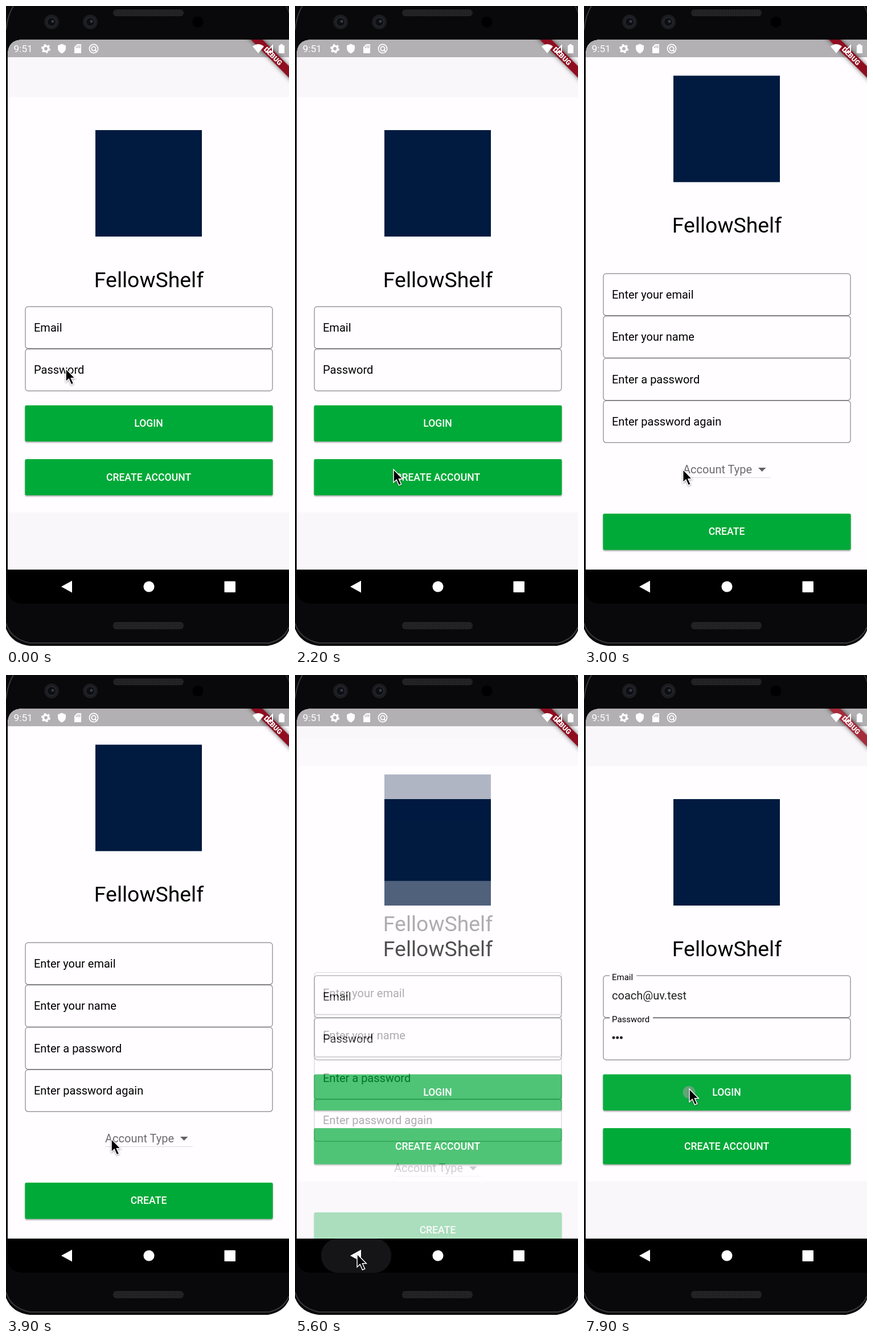
An HTML page that plays this animation: 497x1126 px, repeating every 8000 ms.

```html
<!DOCTYPE html>
<html lang="en">
<head>
<meta charset="utf-8">
<title>Sign-in flow</title>
<style>
  html, body { margin: 0; width: 100%; height: 100%; overflow: hidden; background: #fff; }
  svg { display: block; width: 100%; height: 100%; font-family: Roboto, sans-serif; }
  .title { font-size: 37.4px; text-anchor: middle; }
  .label { font-size: 20px; }
  .small { font-size: 15px; }
  .field { fill: none; stroke: #858487; stroke-width: 1.2; }
  .btn > rect { fill: #00aa38; filter: drop-shadow(0 2px 1.2px rgba(0, 0, 0, .32)); }
  .btn text { fill: #fff; font-size: 17.6px; font-weight: 500; text-anchor: middle; }
</style>
</head>
<body>
<svg viewBox="0 0 497 1126" preserveAspectRatio="none">
  <defs>
    <clipPath id="screen"><path d="M3 990V86Q3 59 30 59H497V990Z"/></clipPath>
    <clipPath id="loginClip"><rect x="33.4" y="701.4" width="435.2" height="63.6" rx="2.4"/></clipPath>
    <clipPath id="createClip"><rect x="33.4" y="796" width="435.2" height="63.6" rx="2.4"/></clipPath>
    <pattern id="mesh" width="4" height="4" patternUnits="userSpaceOnUse">
      <rect width="4" height="4" fill="#242326"/><circle cx="2" cy="2" r="1" fill="#19181a"/>
    </pattern>
  </defs>

  <!-- phone body -->
  <path d="M0 0H497V1097Q488 1119 460 1124H42Q10 1120 0 1094Z" fill="#09080a"/>
  <g fill="none" stroke="#39383b" stroke-width="2">
    <path d="M13 0Q3 16 0 42M0 1084Q8 1112 42 1119H462Q488 1113 497 1091"/>
    <path d="M492 0Q496 6 497 12" stroke="#2a292b"/>
  </g>
  <rect x="188" y="6" width="124" height="12" rx="6" fill="url(#mesh)"/>
  <rect x="188" y="1082" width="124" height="13" rx="6" fill="url(#mesh)"/>
  <g id="cameras"></g>
  <circle cx="337" cy="28" r="9.5" fill="#000"/>

  <!-- pages -->
  <g clip-path="url(#screen)">
    <g id="login"></g>
    <g id="create"></g>
    <rect x="3" y="59" width="494" height="31" fill="#b2b0b2"/>
    <g transform="translate(469.1 87.9) rotate(45)">
      <rect x="-60" y="-7.2" width="120" height="14.4" id="ribbon"
        style="filter:drop-shadow(0 0 4px rgba(0,0,0,.6))"/>
      <text y="4.4" fill="#fff" font-size="12.3" font-weight="900" text-anchor="middle">DEBUG</text>
    </g>
    <g fill="#fff">
      <text x="13.5" y="81" font-size="17.3">9:51</text>
      <g fill="none" stroke="#fff">
        <circle cx="70" cy="75" r="4.6" stroke-width="3.4"/>
        <circle cx="70" cy="75" r="6.8" stroke-width="2.6" stroke-dasharray="3.56"/>
        <circle cx="154" cy="75" r="7.6" stroke-width="1.7"/>
        <circle cx="154" cy="75" r="3.6" stroke-width="1.8"/>
        <path d="M156 77L160 81" stroke-width="2"/>
      </g>
      <path d="M98 66.500L105 69.500V75Q104 81 98 83.500Q92 81 91 75V69.500Z"/>
      <path d="M125 67H132V83H120V72Z"/>
      <path d="M123.500 71V74M126.500 69V74M129.500 69V74" stroke="#b2b0b2" stroke-width="1.4"/>
      <path d="M433 71Q443 63 453 71L443 83Z"/>
      <path d="M469 67V82H455ZM467 72L459 80H467Z" fill-rule="evenodd"/>
      <path d="M481.500 67H486V69H489V83H479V69H481.500Z"/>
    </g>
  </g>

  <!-- navigation bar -->
  <path d="M3 990H497V1050H30Q3 1050 3 1022Z" fill="#000"/>
  <rect id="pill" x="46" y="990" width="123" height="60" rx="29" fill="#2b292c"/>
  <g fill="#fff">
    <path d="M97 1020L116 1009.500V1030.500Z"/>
    <circle cx="251" cy="1020" r="9.500"/>
    <rect x="383.500" y="1010.500" width="19.500" height="19.500" rx="1"/>
  </g>
  <path id="cursor" d="M0 0V23L5.200 18.300L9.500 28L13.700 26.200L9.400 16.800H16.300Z" fill="#000"
    stroke="#fff" stroke-width="1.500" style="filter:drop-shadow(0 1.500px 1.500px rgba(0,0,0,.4))"/>
</svg>
<script>
const $ = id => document.getElementById(id);
const LOOP = 8000, STEP = 100, CUT = 5900;
const PITCH = 74.4;

const text = (x, y, s, cls = 'label', more = '') =>
  `<text x="${x}" y="${Math.round(y)}" class="${cls}" ${more}>${s}</text>`;
const box = y => `<rect class="field" x="34" y="${y}" width="434" height="73.5" rx="4.8"/>`;
const field = (y, s) => box(y) + text(49, y + 43.8, s);
const button = (y, s, extra = '') =>
  `<g class="btn"><rect x="33.4" y="${y}" width="435.2" height="63.6" rx="2.4"/>${extra}` +
  text(250.5, y + 37.6, s, '') + '</g>';
const header = y =>
  `<rect x="157" y="${y + 27}" width="187" height="187" fill="#001a40"/>` +
  text(251, y + 303, 'FellowShelf', 'title');

// press feedback: a tint over the whole button and a growing circle
const press = (id, x, y) =>
  `<g clip-path="url(#${id}Clip)">
     <rect id="${id}Tint" x="33" y="${y - 60}" width="436" height="120" fill="#fff"/>
     <circle id="${id}Ink" cx="${x}" cy="${y}"/></g>`;

// outlined field with its label set into the top border
const filledField = (y, s, gapEnd, value) =>
  box(y) + `<path d="M45 ${y}H${gapEnd}" stroke="#fffdff" stroke-width="3"/>` +
  text(49, y + 7.8, s, 'small') + value;

$('cameras').innerHTML = [80, 148].map(x =>
  `<circle cx="${x}" cy="28" r="13" fill="#1b1c20"/>
   <circle cx="${x}" cy="28" r="8" fill="#0d0e12" stroke="#25272d" stroke-width="2"/>
   <circle cx="${x + 2}" cy="27" r="2.5" fill="#363a46"/>`).join('');

$('login').innerHTML =
  `<rect x="3" y="59" width="494" height="931" fill="#f9f7fa"/>
   <rect x="3" y="160" width="494" height="729.5" fill="#fffdff"/>
   <rect x="3" y="987" width="494" height="3" fill="#fffdff"/>` +
  header(191) +
  `<g id="empty">${field(528.2, 'Email')}${field(528.2 + PITCH, 'Password')}</g>` +
  '<g id="filled">' +
  filledField(528.2, 'Email', 92, text(49, 570, 'coach@uv.test', 'label', 'fill="#222"')) +
  filledField(528.2 + PITCH, 'Password', 121,
    [52, 58.7, 65.4].map(x => `<circle cx="${x}" cy="637" r="2.5" fill="#222"/>`).join('')) +
  '</g>' +
  button(701.4, 'LOGIN', press('login', 184.5, 733)) +
  button(796, 'CREATE ACCOUNT', press('create', 174, 820));

$('create').innerHTML =
  '<rect x="3" y="59" width="494" height="931" fill="#fffdff"/>' +
  header(95.4) +
  ['Enter your email', 'Enter your name', 'Enter a password', 'Enter password again']
    .map((s, i) => field(470.2 + i * PITCH, s)).join('') +
  text(174, 821, 'Account Type', 'label', 'fill="#6b6a6c"') +
  `<path d="M306 811H319.5L312.700 818Z" fill="#626163"/>
   <path d="M174 828.500H328" stroke="#dddbde"/>` +
  button(891.8, 'CREATE');

const clamp = v => Math.min(1, Math.max(0, v));
const ramp = (t, a, b) => clamp((t - a) / (b - a));

// cubic-bezier easing solved by bisection
function bezier(x1, y1, x2, y2) {
  const at = (a, b, u) => 3 * a * u * (1 - u) ** 2 + 3 * b * u * u * (1 - u) + u ** 3;
  return x => {
    let lo = 0, hi = 1;
    for (let i = 0; i < 24; i++) {
      const mid = (lo + hi) / 2;
      if (at(x1, x2, mid) < x) lo = mid; else hi = mid;
    }
    return at(y1, y2, lo);
  };
}
const slide = bezier(.4, 0, .2, 1), fade = bezier(.42, 0, 1, 1), smooth = bezier(.4, 0, .6, 1);

// time, x, y of the pointer tip
const path = [
  [0, 105, 637], [900, 105, 637], [1150, 139, 597], [1850, 172, 808], [2100, 173, 814],
  [2900, 173, 814], [3500, 185, 815], [4500, 185, 815], [5150, 109, 1017],
  [CUT - 1, 109, 1017], [CUT, 212, 614], [6500, 212, 614], [7300, 185, 727], [LOOP, 185, 727]
];
function pointer(t) {
  const i = path.findIndex(p => p[0] > t);
  const [t0, x0, y0] = path[i - 1], [t1, x1, y1] = path[i];
  const k = smooth((t - t0) / (t1 - t0));
  return [x0 + (x1 - x0) * k, y0 + (y1 - y0) * k];
}

function ink(id, r, color, alpha, tint) {
  const c = $(id + 'Ink');
  c.setAttribute('r', r);
  c.setAttribute('fill', color);
  c.setAttribute('opacity', alpha);
  $(id + 'Tint').setAttribute('opacity', tint);
}

function render(t) {
  const open = t < 5000 ? ramp(t, 2680, 2980) : 1 - ramp(t, 5450, 5750);
  const page = $('create');
  page.setAttribute('visibility', open > 0 ? 'visible' : 'hidden');
  page.setAttribute('opacity', open < 1 ? fade(open) : 1);
  page.setAttribute('transform', `translate(0 ${233 * (1 - slide(open))})`);

  const cut = t >= CUT;
  $('empty').setAttribute('visibility', cut ? 'hidden' : 'visible');
  $('filled').setAttribute('visibility', cut ? 'visible' : 'hidden');
  $('ribbon').setAttribute('fill', cut ? '#a62b3b' : '#900d20');

  const pressed = t >= 2450 && t < 3000;
  ink('create', 180 * ramp(t, 2450, 2800), '#fff', pressed ? .1 : 0, pressed ? .03 : 0);
  ink('login', 11 * ramp(t, 7750, 7900), '#b5a0b0', t > 7750 ? .5 : 0, .03 * ramp(t, 7750, 7900));

  $('pill').setAttribute('opacity', ramp(t, 5200, 5400) * (1 - ramp(t, 5450, 5750)));
  $('cursor').setAttribute('transform', `translate(${pointer(t)})`);
}

function tick() {
  const t = performance.now() % LOOP;
  render(Math.floor(t / STEP) * STEP);
  requestAnimationFrame(tick);
}
tick();
</script>
</body>
</html>
```
